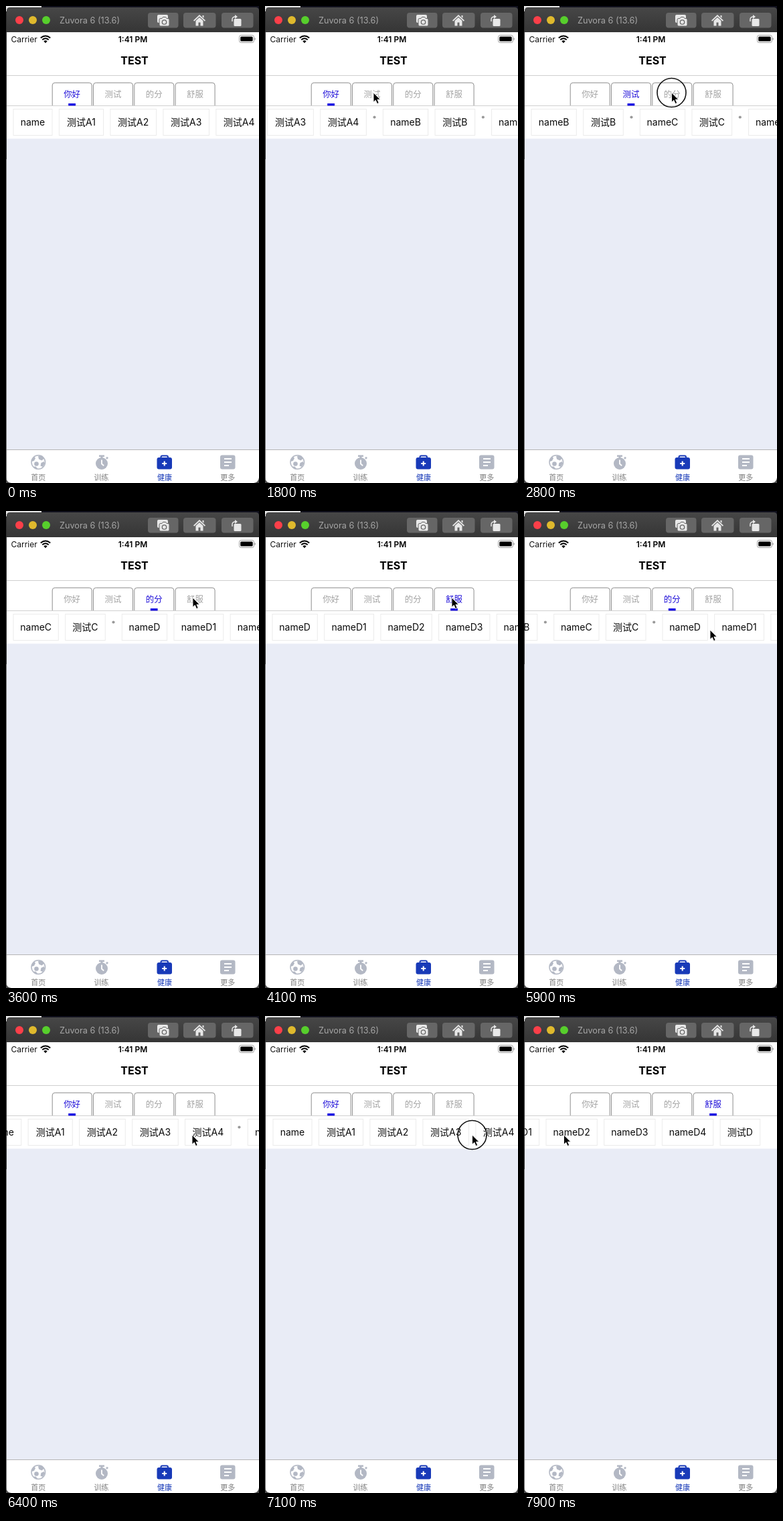
Write an HTML page that moves like this. It is 378 by 710 pixels and loops after 8 s.

```html
<!DOCTYPE html>
<html lang="zh-CN">
<head>
<meta charset="utf-8">
<title>Tab scroll</title>
<style>
  html, body { margin: 0; width: 100%; height: 100%; overflow: hidden; background: #fff; }
  svg { display: block; width: 378px; height: 710px; }
  text { font-family: Inter, "Noto Sans CJK SC", "Noto Sans CJK", sans-serif; }
  .mid { text-anchor: middle; }
  .chip rect { fill: #fff; stroke: #ebebeb; }
  .chip text { font-size: 14px; fill: #0a0a0a; }
  .tab path { fill: #fff; stroke: #8e8e8e; }
  .tab text { font-size: 12.4px; fill: #a2a2a2; }
  .tab rect { fill: #1608e2; visibility: hidden; }
  .tab.on text { fill: #1c0cd8; }
  .tab.on rect { visibility: visible; }
  .nav text { font-size: 11px; fill: #808080; }
</style>
</head>
<body>
<svg viewBox="0 0 378 710">
  <defs>
    <linearGradient id="bar" x2="0" y2="1">
      <stop stop-color="#474747"/><stop offset="1" stop-color="#353535"/>
    </linearGradient>
    <clipPath id="rowClip"><rect x="1" y="149" width="377" height="49"/></clipPath>
  </defs>

  <rect width="378" height="710" fill="#fff"/>
  <rect width="378" height="8" fill="#10101c"/>
  <rect width="53" height="8" fill="#e2e2e2"/>
  <path d="M1 39V7Q1 2 6 2H373Q378 2 378 7V39Z" fill="url(#bar)"/>

  <!-- window bar -->
  <circle cx="20" cy="21" r="6" fill="#fb3f49"/>
  <circle cx="40" cy="21" r="6" fill="#dfb92d"/>
  <circle cx="60" cy="21" r="6" fill="#57cf2c"/>
  <text x="80" y="26" font-size="12.7" fill="#a6a6a6">Zuvora 6 (13.6)</text>
  <g fill="#666">
    <rect x="212" y="10" width="45.5" height="22.5" rx="4"/>
    <rect x="265" y="10" width="48.5" height="22.5" rx="4"/>
    <rect x="322" y="10" width="47.5" height="22.5" rx="4"/>
  </g>
  <g fill="#e8e8e8">
    <rect x="226" y="13" width="16" height="12" rx="2"/>
    <path d="M229 20.5q0-2 2-2h2l1.500-2h4l1.500 2h2q2 0 2 2v7.500q0 2-2 2h-11q-2 0-2-2z" stroke="#666"/>
    <circle cx="236.500" cy="24" r="3.200" fill="none" stroke="#666" stroke-width="1.300"/>
    <path d="M289 13l9 8.500-1.200 1.200L289 15.500l-7.800 7.200L280 21.500zM283.500 22l5.500-5 5.500 5v7.500h-4v-5h-3v5h-4zM293.500 14h2v4l-2-2z"/>
    <rect x="340.500" y="19" width="11" height="11" rx="1.500"/>
    <path d="M338 23v-3q0-4 5-4" fill="none" stroke="#e8e8e8" stroke-width="1.500"/>
    <path d="M342 13l4 3-4 3z"/>
  </g>

  <!-- status bar -->
  <text x="7.500" y="54" font-size="12" fill="#111">Carrier</text>
  <path d="M51.800 47.500Q59 41.500 66.200 47.500M54.300 50.300Q59 46.300 63.700 50.300" fill="none" stroke="#000" stroke-width="2"/>
  <path d="M56.300 52.300Q59 50 61.700 52.300L59 55.200Z"/>
  <text class="mid" x="189.500" y="54" font-size="12" font-weight="600">1:41 PM</text>
  <rect x="348.500" y="43.500" width="22" height="11" rx="2.800" fill="#fff" stroke="#a0a0a0"/>
  <rect x="350.200" y="45.500" width="18.500" height="7" rx="1.500"/>
  <path d="M371.500 47.200q1.500.3 1.500 1.800t-1.500 1.800z" fill="#a0a0a0"/>

  <text class="mid" x="192" y="87" font-size="16" font-weight="700">TEST</text>
  <path d="M1 103.500H378M1 148.500H378" stroke="#d0d0d0"/>
  <g id="tabs"></g>
  <rect x="1" y="197.500" width="377" height="463" fill="#e9ecf6"/>
  <g clip-path="url(#rowClip)"><g id="row"></g></g>

  <!-- bottom navigation -->
  <path d="M1 660.500H378" stroke="#b5b5b5"/>
  <g id="nav" class="nav mid"></g>
  <g fill="#b3b8c4">
    <circle cx="48.300" cy="679" r="10.300" fill="none" stroke="#b3b8c4" stroke-width="1.500"/>
    <circle cx="45.500" cy="681.500" r="3.300"/>
    <path d="M48 670l6-.5 3 4-3.500 3-4.500-2zM39 674l3.500-3 1.500 2-2 4-3.500 1zM52.500 680l4.500-2 1 3-3 5-3.500-1.500zM41 685.500l3.500 0 3 3.500-3 .5z"/>
    <circle cx="143" cy="681" r="9"/>
    <path d="M139 668.500h8v2.500h-2.500v2h-3v-2H139zM149 673l2-2.200 2 2-2 2z"/>
    <path d="M143 675.500v6l3.200 2.700" fill="none" stroke="#fff" stroke-width="1.800"/>
    <rect x="320" y="668.500" width="22.500" height="21" rx="3"/>
    <path d="M326 674h11M326 679h11M326 684h7" stroke="#fff" stroke-width="2"/>
  </g>
  <rect x="225.500" y="672" width="22.500" height="17.500" rx="3" fill="#183ab8"/>
  <path d="M231.500 673v-1.500q0-2 2-2h6.500q2 0 2 2v1.500" fill="none" stroke="#183ab8" stroke-width="2"/>
  <path d="M236.700 677.500v7M233.200 681h7" stroke="#fff" stroke-width="2"/>

  <!-- window edge -->
  <path d="M.5 8V228" stroke="#2a2a2a"/>
  <path d="M.5 228V710" stroke="#6a6a6a"/>
  <path d="M0 702Q1 709.500 8 710H0ZM378 702Q377 709.500 370 710H378Z" fill="#4a4a4a"/>

  <circle id="ring" r="21.500" fill="none" stroke="#111" stroke-width="1.600"/>
  <path id="arrow" d="M0 0V14.200L3.300 11.200L5.600 16.500L8.200 15.400L5.900 10.300H10.300Z" fill="#000" stroke="#fff" stroke-width=".9"/>
</svg>
<script>
const $ = id => document.getElementById(id);
const LOOP = 8000, STEP = 100, SHOW = 800;
const PAD = 11, GAP = 10.4, SECTION_GAP = 25, TAB_Y = 129, ROW_Y = 177;

const sections = [
  'name 测试A1 测试A2 测试A3 测试A4', 'nameB 测试B', 'nameC 测试C',
  'nameD nameD1 nameD2 nameD3 nameD4 测试D'
].map(s => s.split(' '));

// Chip width follows its word, letter and digit
function chipWidth(s) {
  const word = s.startsWith('name') ? 36 : 28.3;
  const letter = /[A-D]/.test(s) ? 9.3 : 0;
  const digit = /1/.test(s) ? 6.5 : /\d/.test(s) ? 9 : 0;
  return 2 * PAD + word + letter + digit;
}

const anchors = [];
let html = '', left = PAD;
sections.forEach((names, i) => {
  if (i) {
    html += `<circle cx="${left + 12.2}" cy="165.500" r="2.100" fill="#999"/>`;
    left += SECTION_GAP;
  }
  anchors.push(left - PAD);
  names.forEach((s, k) => {
    const w = chipWidth(s);
    if (k) left += GAP;
    html += `<g class="chip"><rect x="${left}" y="153.500" width="${w}" height="39"/>
      <text class="mid" x="${left + w / 2}" y="178">${s}</text></g>`;
    left += w;
  });
});
$('row').innerHTML = html;

$('tabs').innerHTML = ['你好', '测试', '的分', '舒服'].map((s, i) =>
  `<g class="tab" transform="translate(${69.2 + 61.3 * i})">
   <path d="M0 148V118Q0 114.300 4 114.300H55Q59 114.300 59 118V148"/>
   <text class="mid" x="29.400" y="135.500">${s}</text>
   <rect x="24" y="145" width="10.800" height="3.400"/></g>`).join('');
const tabs = [...$('tabs').children];

$('nav').innerHTML = ['首页', '训练', '健康', '更多'].map((s, i) =>
  `<text x="${48.3 + 94.3 * i}" y="706"${i === 2 ? ' style="fill:#183ab8"' : ''}>${s}</text>`).join('');

const easeIn = p => p * p;
const easeOut = p => p * (2 - p);
const smooth = p => p * p * (3 - 2 * p);

// Each move is [start, duration, value, ease]
const xMoves = [], yMoves = [], scrolls = [], presses = [];
let offset = 0, mouseX = 325;

function hover(t, ms, x, y) {
  xMoves.push([t, ms, x, smooth]);
  yMoves.push([t, ms, y, smooth]);
  mouseX = x;
}
function scrollTo(t, ms, to, ease) {
  scrolls.push([t, ms, to, ease]);
  offset = to;
}
function tap(t, i) {
  presses.push([t, t + 100]);
  scrollTo(t + 100, 360, anchors[i], smooth);
}
function drag(t, ms, dx, ease) {
  presses.push([t, t + ms]);
  xMoves.push([t, ms, mouseX + dx, ease]);
  mouseX += dx;
  scrollTo(t, ms, offset - dx, ease);
}
const tabX = i => 103.5 + 58.5 * i;

hover(SHOW, 600, tabX(1), TAB_Y);
tap(1500, 1);
hover(2300, 300, tabX(2), TAB_Y);
tap(2800, 2);
hover(3300, 300, tabX(3), TAB_Y);
tap(3640, 3);
hover(4500, 400, 224, ROW_Y);
drag(5000, 400, 68, easeOut);
hover(5400, 200, 150, ROW_Y);
drag(5600, 300, 128, easeIn);
scrollTo(5900, 714, -1, easeOut);
hover(6600, 300, 309.5, ROW_Y);
presses.push([7000, 7100]);
drag(7100, 400, -250, easeIn);
scrollTo(7500, 400, 861, easeOut);

function follow(moves, value, t) {
  for (const [start, ms, to, ease] of moves) {
    if (t < start) break;
    value += (to - value) * ease(Math.min(1, (t - start) / ms));
  }
  return value;
}

function draw(t) {
  const x = follow(scrolls, 0, t);
  const active = Math.max(0, anchors.filter(a => x > a - 80).length - 1);
  const shownTab = x < anchors[1] - 80 ? 0 : active;
  const place = `translate(${follow(xMoves, 325, t)} ${follow(yMoves, 400, t)})`;
  $('row').setAttribute('transform', `translate(${-x})`);
  tabs.forEach((el, i) => el.classList.toggle('on', i === shownTab));
  $('ring').setAttribute('transform', place);
  $('arrow').setAttribute('transform', place);
  $('ring').style.display = presses.some(([a, b]) => t >= a && t < b) ? '' : 'none';
  $('arrow').style.display = t < SHOW ? 'none' : '';
}

const start = performance.now();
function tick() {
  const t = (performance.now() - start) % LOOP;
  draw(Math.floor(t / STEP) * STEP);
  requestAnimationFrame(tick);
}
tick();
</script>
</body>
</html>
```
